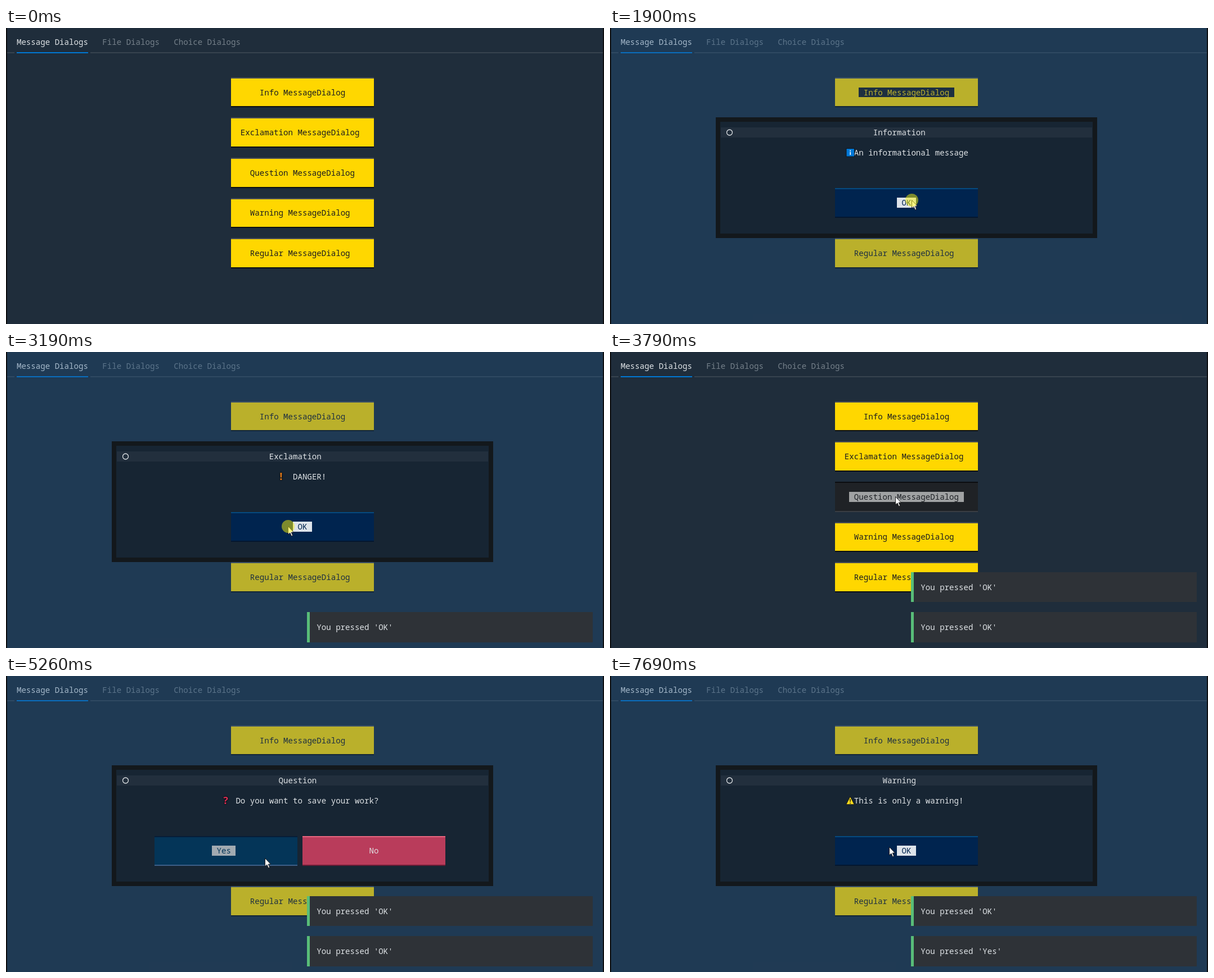
Animation, 1063 px wide and 527 px high, one loop 8 s. Source, as an HTML page:

```html
<!DOCTYPE html>
<html lang="en">
<head>
<meta charset="utf-8">
<title>Message dialogs</title>
<style>
  html, body { margin: 0; width: 100%; height: 100%; overflow: hidden; background: #0d0f11; }
  #stage {
    position: relative; width: 1063px; height: 527px; overflow: hidden;
    font: 500 14.11px/17.9px 'Noto Sans Mono', 'DejaVu Sans Mono', monospace;
    color: #dfe3e6; white-space: pre; font-variant-ligatures: none;
  }
  #stage div, #stage svg { position: absolute; box-sizing: border-box; }
  #page, #shade { left: 2px; top: 0; width: 1059px; height: 527px; }
  #page { background: #1f2d3b; }
  #shade { background: rgba(34, 88, 140, .31); }
  .line { height: 2px; top: 42.5px; background: #37434f; }
  .line.on { background: #0078d4; }
  .dim { color: #75808a; }

  .button { background: var(--bg); color: var(--fg); border: solid; border-width: 2px 0; border-color: var(--top) transparent var(--bot); }
  .button .label { margin-top: -2px; }
  .button.focus .label { background: var(--fg); color: var(--bg); }
  .gold { --bg: #ffd700; --fg: #1b1d1f; --top: #4a4f55; --bot: #0c0f12; }
  .gold.hover { --bg: #1e1f22; --fg: #dcdddd; --top: #2e3237; --bot: #0c0d0f; }
  .gold.hover.down { --bg: #1f2226; --fg: #a0a2a3; --top: #0b0d10; --bot: #3a3e44; }
  .blue { --bg: #004578; --fg: #dde3ea; --top: #4a7db8; --bot: #04203f; }
  .blue.hover { --bg: #00244f; --top: #054a80; --bot: #041630; }
  .blue.hover.down { --bg: #043558; --fg: #a2aab1; --top: #061d38; --bot: #3c5f88; }
  .red { --bg: #b93c5b; --fg: #e0dde0; --top: #e8667f; --bot: #6d1c36; }

  .dialog { background: #172533; border: solid #13181c; border-width: 8.95px 8.47px; }
  .title { background: #222f3d; }
  .glyph { font-weight: 700; font-size: 18px; text-align: center; text-shadow: 0 0 2px #000, 0 0 2px #000; }

  #toasts { left: 535px; top: 0; width: 508px; height: 517px; display: flex; flex-direction: column; justify-content: flex-end; gap: 17.9px; }
  #toasts .toast { position: static; height: 53.7px; padding: 17.9px 0 0 12.3px; background: #2e3237; border-left: 5px solid #58bd78; }
  #ring { width: 23px; height: 23px; margin: -11.5px; border-radius: 50%; background: rgba(250, 242, 12, .5); }
  #cursor { left: 0; top: 0; width: 14px; height: 21px; overflow: visible; }
</style>
</head>
<body>
<div id="stage"></div>
<script>
const COL = 8.467, ROW = 17.9, LOOP = 8000;
const X = c => 2 + c * COL, Y = r => r * ROW - 1.8;
const stage = document.getElementById('stage');

function add(cls, id) {
  const el = document.createElement('div');
  el.className = cls;
  if (id) el.id = id;
  stage.append(el);
  return el;
}

// Place a box on the character grid
function cell(cls, col, row, w, h, text = '') {
  const el = add(cls);
  el.style.cssText = `left:${X(col)}px;top:${Y(row)}px;width:${w * COL}px;height:${h * ROW}px`;
  el.textContent = text;
  return el;
}

function button(kind, col, row, text) {
  const el = cell('button ' + kind, col, row, 30, 3);
  const n = text.length + 2;
  const label = document.createElement('div');
  label.className = 'label';
  label.textContent = ` ${text} `;
  label.style.cssText = `left:${Math.floor((30 - n) / 2) * COL}px;top:${ROW}px;width:${n * COL}px;height:${ROW}px`;
  el.append(label);
  return { el, x: X(col), y: Y(row), w: 30 * COL, h: 3 * ROW };
}

function svg(markup, id = '') {
  stage.insertAdjacentHTML('beforeend', `<svg id="${id}" style="left:0;top:0" width="1063" height="527">${markup}</svg>`);
  return stage.lastElementChild;
}

function line(cls, from, to) {
  add('line ' + cls).style.cssText = `left:${from}px;width:${to - from}px`;
}

function glyph(char, x, color) {
  const el = add('glyph');
  el.textContent = char;
  el.style.cssText = `left:${x - 8}px;top:${Y(12)}px;width:16px;color:${color}`;
}

add('', 'page');
cell('', 2, 1, 16, 1, 'Message Dialogs');
cell('dim', 20, 1, 13, 1, 'File Dialogs');
cell('dim', 35, 1, 15, 1, 'Choice Dialogs');
line('', 2, 15);
line('on', 19, 146);
line('', 150, 1061);

const mains = ['Info', 'Exclamation', 'Question', 'Warning', 'Regular']
  .map((name, i) => button('gold', 47, 5 + 4 * i, name + ' MessageDialog'));
const shade = add('', 'shade');

const icons = [
  () => svg(`<rect x="420" y="214.5" width="14.5" height="14.5" fill="#0078d7" stroke="#0c151d"/>
    <path d="M427.2 217.5v2M427.2 220.7v5.3" stroke="#fff" stroke-width="1.6"/>`),
  () => glyph('!', 489, '#e07a1c'),
  () => glyph('?', 390.5, '#dc2f55'),
  () => svg(`<path d="M427 214.5l7.3 14.3h-14.6z" fill="#fbdc1e" stroke="#1a1a14"/>
    <path d="M427 219v5M427 225.4v1.8" stroke="#2a2610" stroke-width="1.5"/>`)
];

// Everything a dialog appends is shown or hidden together
const dialogs = [
  ['Information', 51, 'An informational message'],
  ['Exclamation', 60, 'DANGER!'],
  ['Question', 48, 'Do you want to save your work?'],
  ['Warning', 51, 'This is only a warning!']
].map(([title, col, text], i) => {
  const first = stage.children.length;
  cell('dialog', 22, 9, 80, 12);
  cell('title', 23, 10, 78, 1);
  cell('', Math.floor(61 - title.length / 2), 10, 20, 1, title);
  svg('<circle cx="212.5" cy="186" r="5" fill="none" stroke="#dfe3e6" stroke-width="1.3"/>');
  cell('', col, 12, 40, 1, text);
  icons[i]();
  const buttons = i === 2
    ? [button('blue', 31, 16, 'Yes'), button('red', 62, 16, 'No')]
    : [button('blue', 47, 16, 'OK')];
  buttons[0].el.classList.add('focus');
  return { parts: [...stage.children].slice(first), buttons };
});

const tray = add('', 'toasts');
const toasts = ['OK', 'OK', 'Yes'].map(name => {
  const el = add('toast');
  el.textContent = `You pressed '${name}'`;
  tray.append(el);
  return el;
});
const cursor = svg('<path d="M.5.5V15l3.4-3.1 2.5 5.8 2.3-1-2.5-5.6h4.3z" fill="#fff" stroke="#111" stroke-width=".9"/>', 'cursor');
const ring = add('', 'ring');

// Timeline of state changes
const cues = [[0, { hot: 0, ring: 0, down: 0, focus: -1, dialog: -1, said: 0, gone: 0 }]];
const at = (t, patch) => cues.push([t, patch]);
function press(t, gap, spot, patch, after) {
  at(t, { ring: spot });
  at(t + 70, { ring: 0, down: 1, ...patch });
  at(t + gap, { down: 0, ...after });
}
const open = (t, gap, spot, i) => press(t, gap, spot, { focus: i }, { dialog: i, hot: 0 });
const shut = (t, gap, spot, said) => press(t, gap, spot, {}, { dialog: -1, hot: 1, said });

at(960, { hot: 1 });
open(1030, 190, [528, 115], 0);
at(1360, { hot: 1 });
shut(1900, 135, [536, 306], 1);
open(2500, 135, [506, 186], 1);
at(2690, { hot: 1 });
shut(3190, 135, [501, 310], 2);
open(3720, 140, [507, 257], 2);
at(4060, { hot: 1 });
shut(5190, 130, [460, 324], 3);
open(6320, 150, [504, 327], 3);
at(6940, { hot: 1 });
at(7080, { gone: 1 });
at(7550, { ring: [495.5, 310] });
at(7690, { ring: 0 });

// Pointer path: time, x, y
const path = [
  [150, 982, 517], [890, 528, 115], [1300, 528, 115], [1830, 536, 306], [2050, 536, 306],
  [2430, 506, 186], [2640, 506, 186], [2960, 499, 307], [3030, 501, 310], [3320, 501, 310],
  [3650, 507, 257], [3860, 507, 257], [4000, 513, 287], [4330, 482, 328], [4730, 460, 324],
  [5520, 460, 324], [5860, 504, 327], [6880, 504, 327], [7220, 496, 304], [8100, 496, 304]
];
const TICK = 67.25;

function pointer(t) {
  const s = 150 + TICK * Math.max(0, Math.floor((t - 136) / TICK));
  const i = Math.max(1, path.findIndex(p => p[0] > s));
  const [t0, x0, y0] = path[i - 1], [t1, x1, y1] = path[i];
  const u = (s - t0) / (t1 - t0), e = u * u * (3 - 2 * u);
  return [x0 + (x1 - x0) * e, y0 + (y1 - y0) * e];
}

const show = (el, on) => { el.style.visibility = on ? 'visible' : 'hidden'; };

function draw(t) {
  const s = {};
  for (const [time, patch] of cues) if (time <= t) Object.assign(s, patch);
  const [x, y] = pointer(t);
  const live = s.dialog < 0 ? mains : dialogs[s.dialog].buttons;

  for (const b of [...mains, ...dialogs.flatMap(d => d.buttons)]) {
    const hover = !!s.hot && live.includes(b) && x >= b.x && x < b.x + b.w && y >= b.y && y < b.y + b.h;
    b.el.classList.toggle('hover', hover);
    b.el.classList.toggle('down', hover && !!s.down);
  }
  mains.forEach((b, i) => b.el.classList.toggle('focus', i === s.focus));
  show(shade, s.dialog >= 0);
  dialogs.forEach((d, i) => d.parts.forEach(el => show(el, i === s.dialog)));
  toasts.forEach((el, i) => { el.style.display = i >= s.gone && i < s.said ? 'block' : 'none'; });

  show(cursor, t >= 150);
  cursor.style.transform = `translate(${x}px, ${y}px)`;
  show(ring, s.ring);
  if (s.ring) [ring.style.left, ring.style.top] = s.ring.map(v => v + 'px');
}

const start = performance.now();
function tick() {
  draw((performance.now() - start) % LOOP);
  requestAnimationFrame(tick);
}
tick();
</script>
</body>
</html>
```
